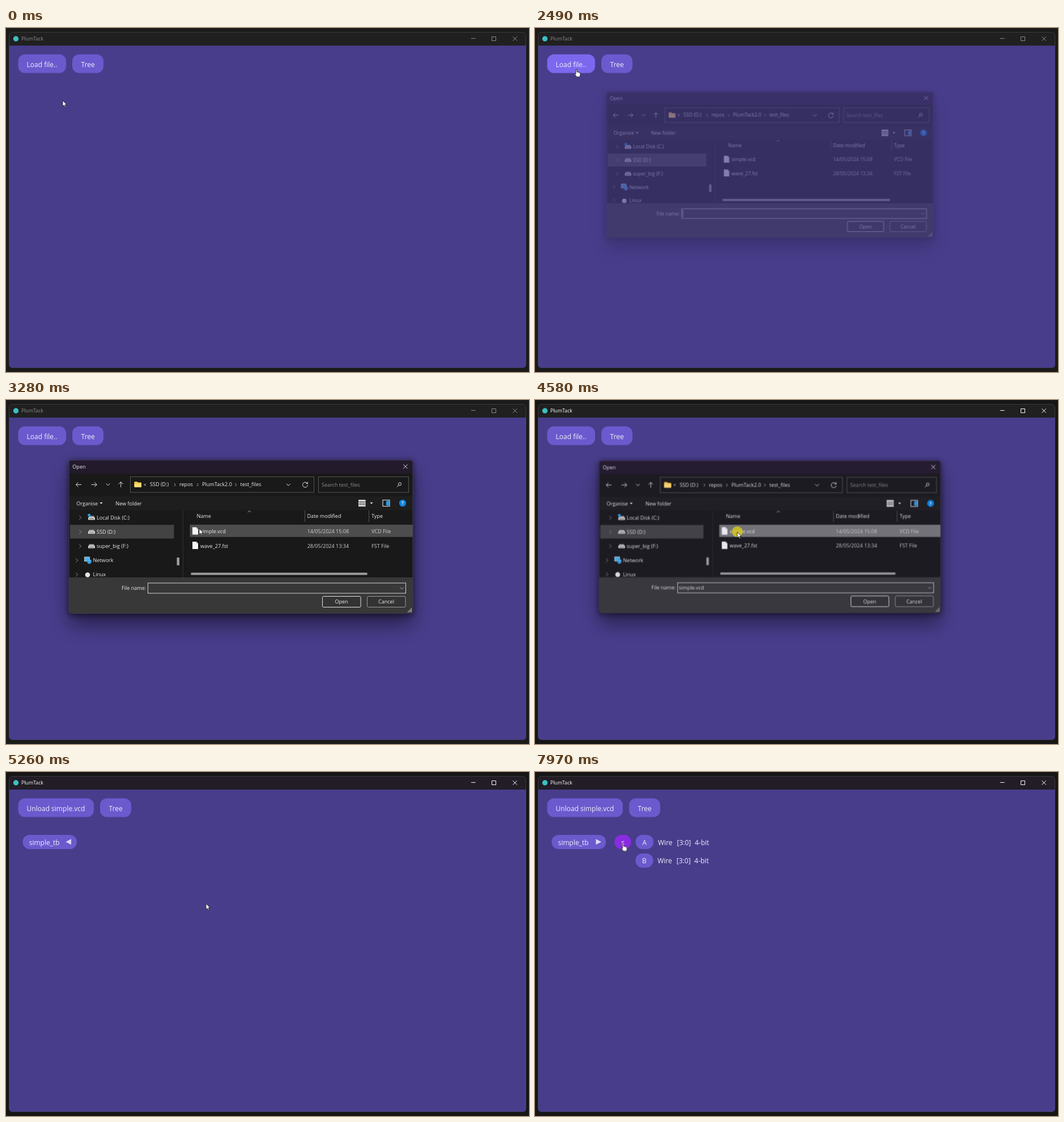
Recreate the animation shown at these times as an HTML page. Size 923 px wide and 607 px high, loop 8 s.

```html
<!DOCTYPE html>
<html lang="en">
<head>
<meta charset="utf-8">
<title>PlumTack</title>
<style>
html, body { margin: 0; width: 100%; height: 100%; overflow: hidden; background: #1a1a1a; }
svg { display: block; width: 923px; height: 607px; }
text { font: 9.05px "Open Sans", "Noto Sans", sans-serif; fill: #ececec; white-space: pre; }
.app text { font-size: 12px; fill: #efedfb; }
.mid { text-anchor: middle; }
.btn { fill: #6a5acd; }
.line { fill: none; stroke: #e4e4e4; stroke-width: 1; }
.thin { fill: none; stroke: #a8a8a8; stroke-width: 1; }
.soft { fill: #cfcfcf; }
.white { fill: #ececec; }

/* One loop is 8 s, so 1% is 80 ms. */
.anim { animation: 8s step-end infinite; }
#frame { animation-name: frame; }
#bar { animation-name: bar; }
#caption { color: #8c8c8c; animation-name: caption; }
#caption text { font-size: 8.8px; fill: currentColor; }
#caption path { fill: none; stroke: currentColor; }
#before { animation-name: before; }
#after { animation-name: after; }
#load { animation-name: load; }
#dialog { transform-origin: 414.5px 241px; animation-name: dialog; }
#caret { animation-name: caret; }
#row { animation-name: row; }
#picked { animation-name: picked; }
#closed { animation-name: closed; }
#opened { animation-name: opened; }
#s { animation-name: s; }
#wires { animation-name: wires; }
#cursor { animation-name: move; }
#arrow { animation-name: arrow; }
#hand { animation-name: hand; }
#click { animation-name: click; }
.near { filter: blur(5px); opacity: .42; }
.far { filter: blur(17px); opacity: .46; }

@keyframes frame { 0% { fill: #1b1b1b } 57.25%, 100% { fill: #161616 } }
@keyframes bar { 0% { fill: #202020 } 59.25%, 100% { fill: #221d26 } }
@keyframes caption {
  0%, 27.625% { color: #8c8c8c }
  25.875%, 57.25%, 100% { color: #fff }
}
@keyframes before { 0% { opacity: 1 } 60%, 100% { opacity: 0 } }
@keyframes after { 0% { opacity: 0 } 60%, 100% { opacity: 1 } }
@keyframes load { 0%, 33.5%, 100% { fill: #6a5acd } 20.025% { fill: #7b68ee } }
@keyframes dialog {
  0% { opacity: 0; transform: scale(.9) }
  31.125% { opacity: .35; transform: scale(.95) }
  31.9% { opacity: .85; transform: scale(.985) }
  32.75% { opacity: 1; transform: scale(.996) }
  33.5% { opacity: 1; transform: none }
  57.25% { opacity: .93; transform: scale(.993) }
  58.375% { opacity: .4; transform: scale(.96) }
  59.25%, 100% { opacity: 0; transform: scale(.9) }
}
@keyframes caret { 0%, 46.125% { opacity: 1 } 39.375%, 52.875%, 100% { opacity: 0 } }
@keyframes row {
  0% { fill: #4d4d4d; opacity: 0 }
  40.25% { fill: #4d4d4d; opacity: 1 }
  54.625%, 100% { fill: #777; opacity: 1 }
}
@keyframes picked { 0% { opacity: 0 } 54.625%, 100% { opacity: 1 } }
@keyframes closed {
  0% { opacity: 1; fill: #dcd8f4 }
  79.525% { opacity: 1; fill: #fff }
  82.125%, 100% { opacity: 0; fill: #fff }
}
@keyframes opened {
  0% { opacity: 0; fill: #fff }
  82.125% { opacity: 1; fill: #fff }
  87%, 100% { opacity: 1; fill: #dcd8f4 }
}
@keyframes s { 0% { fill: #6a5acd } 90.75% { fill: #7b68ee } 93.625%, 100% { fill: #8a2be2 } }
@keyframes wires { 0% { opacity: 0 } 93.625%, 100% { opacity: 1 } }
@keyframes move {
  0% { transform: translate(100px, 128px) }
  13.125% { transform: translate(100px, 128px); animation-timing-function: steps(6, start) }
  18.3% { transform: translate(83px, 85px); animation-timing-function: steps(5, start) }
  22.6% { transform: translate(73px, 73px) }
  32.75% { transform: translate(73.5px, 74px) }
  33.5% { transform: translate(73.5px, 74px); animation-timing-function: steps(4, start) }
  36.9% { transform: translate(215px, 152px); animation-timing-function: steps(6, start) }
  41.83% { transform: translate(341px, 227px) }
  41.875% { transform: translate(341px, 227px); animation-timing-function: steps(3, start) }
  44.3% { transform: translate(357px, 233px) }
  65.75% { transform: translate(357px, 233px); animation-timing-function: steps(3, start) }
  68.3% { transform: translate(345px, 231px); animation-timing-function: steps(5, start) }
  72.55% { transform: translate(180px, 158px); animation-timing-function: steps(4, start) }
  75.98% { transform: translate(129px, 135px) }
  76.125% { transform: translate(129px, 135px); animation-timing-function: steps(6, start) }
  81.2% { transform: translate(112px, 120.5px) }
  87% { transform: translate(112px, 120.5px); animation-timing-function: steps(7, start) }
  93.56% { transform: translate(152px, 128.5px) }
  98.75% { transform: translate(153.5px, 127.5px) }
  99.6%, 100% { transform: translate(155.5px, 126.5px) }
}
@keyframes arrow {
  0%, 33.5%, 87% { opacity: 1 }
  20.025%, 79.525%, 90.75%, 100% { opacity: 0 }
}
@keyframes hand {
  0%, 33.5%, 87% { opacity: 0 }
  20.025%, 79.525%, 90.75%, 100% { opacity: 1 }
}
@keyframes click {
  0%, 27.625%, 55.5%, 58.375%, 83.75%, 95.5%, 100% { opacity: 0 }
  25.875%, 54.625%, 56.375%, 82.125%, 93.625% { opacity: 1 }
}
</style>
</head>
<body>
<svg viewBox="0 0 923 607" xmlns="http://www.w3.org/2000/svg">
  <defs>
    <g id="drive">
      <path d="M2 0h8l2 4H0z" fill="#a9a9a9"/>
      <rect y="3" width="12" height="4" rx="1" fill="#e4e4e4"/>
      <path d="M1.5 5h9" stroke="#444"/>
    </g>
    <g id="file">
      <path d="M0 0h7l3 3v10H0z" fill="#f6f6f6"/>
      <path d="M7 0v3h3z" fill="#b5b5b5"/>
    </g>
    <path id="right" d="M-1.7-3.4 1.7 0-1.7 3.4"/>
    <path id="down" d="M-3.3-1.6 0 1.7 3.3-1.6"/>
    <path id="drop" d="M-2.6-1.3h5.2L0 1.5z"/>
  </defs>

  <!-- Main window -->
  <rect id="frame" class="anim" width="923" height="607"/>
  <rect id="bar" class="anim" x="5.5" y="7.5" width="912" height="592" rx="6" stroke="#3b3b3b"/>
  <path d="M5.5 31h912.5v562.5q0 6-6 6H11.500q-6 0-6-6z" fill="#483d8b"/>
  <circle cx="17.500" cy="19" r="4.700" fill="#3cc0c2"/>
  <g id="caption" class="anim">
    <text x="27" y="22.300">PlumTack</text>
    <path d="M821 18.500h7.500M857.500 15.500h7v7h-7zM894.500 15.200l7.400 7.400M901.900 15.200l-7.400 7.400"/>
  </g>

  <g id="before" class="app anim">
    <rect id="load" class="anim" x="21.500" y="46.500" width="84.500" height="33" rx="12"/>
    <rect class="btn" x="117" y="46.500" width="55" height="33" rx="12"/>
    <text class="mid" x="63.500" y="68.500">Load file..</text>
    <text class="mid" x="144.700" y="68.500">Tree</text>
  </g>

  <g id="after" class="app anim">
    <rect class="btn" x="21.500" y="46.500" width="133.500" height="33" rx="12"/>
    <rect class="btn" x="166" y="46.500" width="55" height="33" rx="12"/>
    <text class="mid" x="88" y="68.500">Unload simple.vcd</text>
    <text class="mid" x="193.700" y="68.500">Tree</text>
    <rect class="btn" x="29.500" y="111" width="95.500" height="25" rx="12"/>
    <text x="40.700" y="128.500">simple_tb</text>
    <path id="closed" class="anim" d="M105.500 123.300l9.500-5v10z"/>
    <g id="opened" class="anim">
      <path d="M117 123.300l-9.500-5v10z"/>
      <rect id="s" class="anim" x="140.500" y="111" width="29" height="25" rx="12"/>
      <text class="mid" x="155" y="128.500">s</text>
    </g>
    <g id="wires" class="anim">
      <rect class="btn" x="177.500" y="111" width="31.500" height="25" rx="12"/>
      <text class="mid" x="193.300" y="128.500">A</text>
      <text x="217" y="128.500">Wire</text>
      <text x="250.500" y="128.500">[3:0]</text>
      <text x="282" y="128.500">4-bit</text>
      <rect class="btn" x="177.500" y="143.700" width="31" height="25" rx="12"/>
      <text class="mid" x="193" y="161.200">B</text>
      <text x="216.300" y="161.200">Wire</text>
      <text x="249.800" y="161.200">[3:0]</text>
      <text x="281.300" y="161.200">4-bit</text>
    </g>
  </g>

  <!-- Open dialog -->
  <g id="dialog" class="anim">
    <rect class="far" x="111" y="126" width="607" height="271" rx="6"/>
    <rect class="near" x="109" y="106" width="611" height="275" rx="6"/>
    <rect x="111" y="106.300" width="607" height="270.200" rx="5" fill="#191919"/>
    <path d="M111 129.500v-18q0-5 5-5h597q5 0 5 5v18z" fill="#231a2c"/>
    <rect x="111" y="170" width="607" height="24.500" fill="#1e1e1e"/>
    <text x="117.300" y="121.300">Open</text>
    <path class="line" d="M701.200 113.700l7.400 7.400M708.600 113.700l-7.400 7.400"/>

    <path class="line" d="M133 149.300h-9.500m4-4-4 4 4 4M150.700 149.300h9.500m-4-4 4 4-4 4M202.700 154v-9.500m-4 4 4-4 4 4"/>
    <use href="#down" class="line" x="180" y="149"/>
    <rect class="thin" x="219.500" y="135.500" width="324" height="27.500" style="stroke:#555"/>
    <rect class="thin" x="551.500" y="135.500" width="159" height="27.500" style="stroke:#555"/>
    <path d="M226.500 145q0-1 1-1h4l1.500 1.500h5q1 0 1 1v6.500q0 1-1 1h-10.500q-1 0-1-1z" fill="#ffc83d"/>
    <path d="M226.500 147.500h12.500v5.500q0 1-1 1h-10.500q-1 0-1-1z" fill="#ffdb78"/>
    <text x="243" y="151.800" class="soft">«</text>
    <text x="254" y="152.300">SSD (D:)</text>
    <text x="306" y="152.300">repos</text>
    <text x="346" y="152.300">PlumTack2.0</text>
    <text x="413.500" y="152.300">test_files</text>
    <g class="line">
      <use href="#right" transform="translate(298 149.500) scale(.75)"/>
      <use href="#right" transform="translate(338 149.500) scale(.75)"/>
      <use href="#right" transform="translate(405.500 149.500) scale(.75)"/>
      <use href="#down" x="498.300" y="149.500"/>
      <path d="M531.800 147.300a4.500 4.500 0 1 0 .6 3M532.300 144.500v3h-3"/>
      <circle cx="695" cy="148.300" r="2.500"/>
      <path d="M693.200 150.100l-3.300 3.300"/>
    </g>
    <text x="557" y="152.500" style="fill:#8d8d8d">Search test_files</text>

    <text x="124.300" y="185.500">Organise</text>
    <use href="#drop" class="white" x="168" y="182"/>
    <text x="193.300" y="185.500">New folder</text>
    <rect x="622" y="176" width="12.500" height="12" fill="#d6d6d6"/>
    <path d="M623 179.500h10.500M623 182h10.500M623 184.500h10.500" stroke="#444"/>
    <use href="#drop" class="white" x="645" y="182"/>
    <rect x="665" y="176.500" width="12" height="11" fill="#1e1e1e" stroke="#eee"/>
    <rect x="671" y="178" width="5" height="8" fill="#2b9be6"/>
    <circle cx="700" cy="182" r="6.200" fill="#0b84dc"/>
    <text class="mid" x="700" y="185.300" style="font-weight:700">?</text>

    <!-- Folder tree -->
    <rect x="113" y="220.300" width="183.500" height="24.200" fill="#434343"/>
    <g class="thin" style="stroke:#8c8c8c">
      <use href="#right" x="131" y="207.500"/>
      <use href="#right" x="131" y="232.500"/>
      <use href="#right" x="131" y="258"/>
      <use href="#right" x="125" y="283"/>
      <use href="#right" x="125" y="308"/>
    </g>
    <use href="#drive" x="145" y="204.500"/>
    <rect x="144.500" y="201" width="4.500" height="4.500" fill="#1e9be8"/>
    <use href="#drive" x="145" y="229"/>
    <use href="#drive" x="145" y="254.500"/>
    <rect x="138.500" y="277" width="9" height="7.500" fill="#4fb4ec" stroke="#c6dcea" stroke-width=".8"/>
    <circle cx="147" cy="285" r="4" fill="#2f8fd3"/>
    <path d="M144 284q3-3 6 0M147 281v8" fill="none" stroke="#9bd6f5" stroke-width=".8"/>
    <circle cx="144" cy="308.500" r="4.300" fill="#e6e6e6"/>
    <text x="160" y="210.800">Local Disk (C:)</text>
    <text x="160" y="235.800">SSD (D:)</text>
    <text x="160" y="261.200">super_big (F:)</text>
    <text x="153.500" y="286.200">Network</text>
    <text x="153.500" y="311.300">Linux</text>
    <rect x="301.500" y="278" width="4.500" height="13.700" fill="#9d9d9d"/>
    <path d="M312.500 194.500v118.500" stroke="#2f2f2f"/>

    <!-- File list -->
    <path d="M527.500 195v20M640.500 195v20" stroke="#555"/>
    <path class="thin" d="M426.500 198l3-2.500 3 2.500"/>
    <text x="336.500" y="208.300">Name</text>
    <text x="531.500" y="208.300">Date modified</text>
    <text x="645" y="208.300">Type</text>
    <rect id="row" class="anim" x="324.500" y="220" width="393.500" height="21.700"/>
    <use href="#file" x="329" y="224.500"/>
    <use href="#file" x="329" y="250"/>
    <text x="343" y="234.700">simple.vcd</text>
    <text x="343" y="260.700">wave_27.fst</text>
    <text class="soft" x="531.700" y="234.700">14/05/2024 15:08</text>
    <text class="soft" x="531.700" y="260.700">28/05/2024 13:34</text>
    <text class="soft" x="645" y="234.700">VCD File</text>
    <text class="soft" x="645" y="260.700">FST File</text>
    <rect x="326.500" y="304.700" width="311" height="4" fill="#9d9d9d"/>

    <!-- Name field and buttons -->
    <path d="M111 313h607v58.500q0 5-5 5H116q-5 0-5-5z" fill="#383838"/>
    <text x="204" y="335.200">File name:</text>
    <rect class="thin" x="250.500" y="323" width="455" height="18" style="stroke:#d2d2d2"/>
    <text id="picked" class="anim" x="252.800" y="335.200">simple.vcd</text>
    <path id="caret" class="anim" d="M252.800 325v13.500" stroke="#eee"/>
    <use href="#down" class="thin" x="698.500" y="332"/>
    <rect x="558.500" y="346.500" width="67.500" height="19" rx="2" fill="#333" stroke="#e6e6e6"/>
    <rect x="637.500" y="346.500" width="67.500" height="19" rx="2" fill="#333" stroke="#9b9b9b"/>
    <text class="mid" x="592" y="359.400">Open</text>
    <text class="mid" x="671" y="359.400">Cancel</text>
    <path d="M715 367.500v7M712.500 370v4.500M710 372.500v2" stroke="#c4c4c4" stroke-width="1.700" stroke-dasharray="1.700 .8"/>
    <rect x="111" y="106.300" width="607" height="270.200" rx="5" fill="none" stroke="#463f52" stroke-width=".8"/>
  </g>

  <g id="cursor" class="anim">
    <circle id="click" class="anim" cy="-.5" r="9.500" fill="#d8c81c" fill-opacity=".8"/>
    <g fill="#fff" stroke="#111" stroke-width=".8" stroke-linejoin="round">
      <path id="arrow" class="anim" d="M0 0v10.200l2.400-2.200 1.600 3.500 1.600-.7-1.600-3.400h3.200z"/>
      <path id="hand" class="anim" d="M-1 8.300V1.200Q-1 0 0 0T1 1.200V4.800Q2.800 4 3 5.200 4.800 4.600 5 5.800 6.900 5.300 6.900 7.200V9.500Q6.600 11.500 5.800 13.200H.6Q-1 10.800-2.800 8.800-3.200 6.800-1 8.300z"/>
    </g>
  </g>
</svg>
</body>
</html>
```
